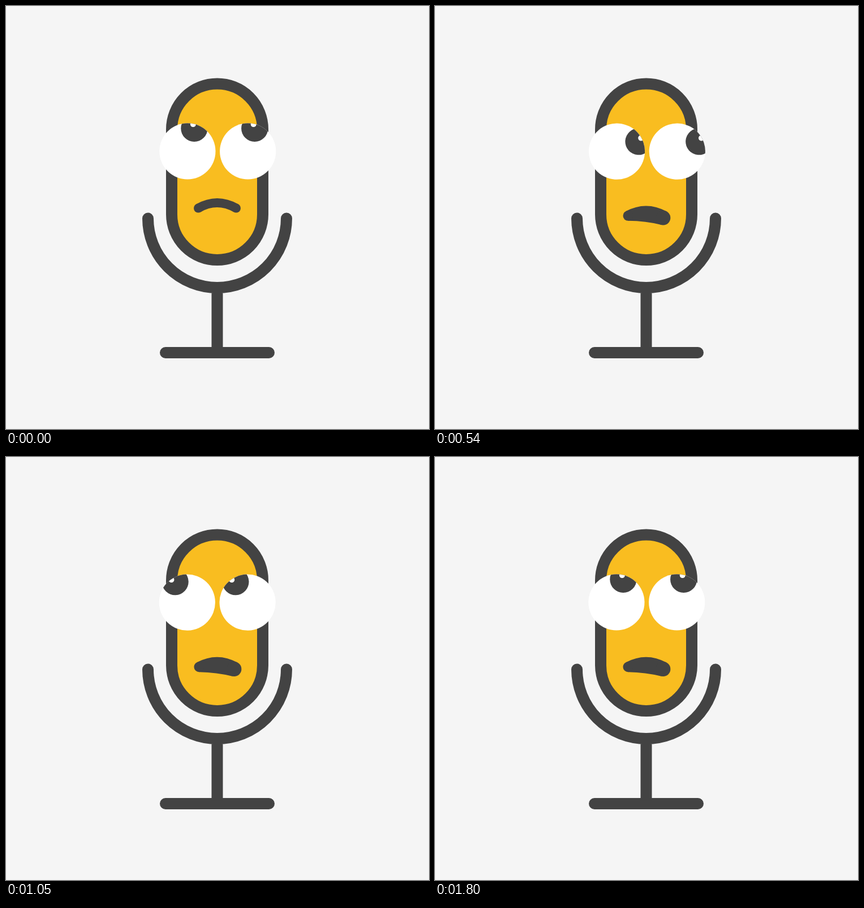
Animation of 748x748 px, one loop 1830 ms. Source, as an HTML page:

```html
<!DOCTYPE html>
<html lang="en">
<head>
<meta charset="utf-8">
<title>Microphone rolling its eyes</title>
<style>
  html, body { margin: 0; width: 100%; height: 100%; overflow: hidden; background: #f5f5f5; }
  svg { display: block; width: 100%; height: 100%; }
</style>
</head>
<body>
<svg viewBox="0 0 748 748">
  <defs>
    <clipPath id="eyeball"><circle cy="-.8" r="49.6"/></clipPath>
    <g id="eye">
      <circle cy="-.8" r="49.6" fill="#fff"/>
      <g clip-path="url(#eyeball)">
        <circle cx="12" cy="-41.3" r="23.6" fill="#434343"/>
        <circle cx="10" cy="-48.6" r="5" fill="#fff"/>
      </g>
    </g>
  </defs>
  <rect width="748" height="748" fill="#f5f5f5"/>
  <g fill="none" stroke="#434343" stroke-width="20" stroke-linecap="round">
    <rect x="293" y="137.5" width="161" height="311.5" rx="80.5" fill="#f9bd20"/>
    <path d="M251 375.5a122.5 122.5 0 0 0 245 0M373.5 498V613M282 613H465"/>
  </g>
  <use class="eye" href="#eye"/>
  <use class="eye" href="#eye"/>
  <g fill="#434343">
    <path id="lips"/>
    <circle id="leftCorner"/>
    <circle id="rightCorner"/>
  </g>
</svg>
<script>
  const LOOP = 1830, STEP = 30;
  const find = id => document.getElementById(id);
  const eyes = document.querySelectorAll('.eye');

  const mix = (a, b, u) => a + (b - a) * u;
  const progress = (t, start, length) => Math.min(1, Math.max(0, (t - start) / length));
  const smooth = u => u * u * (3 - 2 * u);
  // Backs up a little, then swings forward and settles.
  const windUp = u => u * (-0.9 + u * (4.8 - 2.9 * u));

  // Point where a line from p touches circle c; side picks one of the two.
  function touch(c, p, side) {
    const dx = p.x - c.x, dy = p.y - c.y;
    const angle = Math.atan2(dy, dx) + side * Math.acos(c.r / Math.hypot(dx, dy));
    return `${c.x + c.r * Math.cos(angle)} ${c.y + c.r * Math.sin(angle)}`;
  }

  function placeCircle(id, { x, y, r }) {
    const circle = find(id);
    circle.setAttribute('cx', x);
    circle.setAttribute('cy', y);
    circle.setAttribute('r', r);
  }

  // Two round corners joined by curves that leave each corner smoothly.
  function drawMouth(open) {
    const left = { x: mix(340, 341.5, open), y: mix(357.5, 371.2, open), r: mix(8, 9, open) };
    const right = { x: mix(407, 403.4, open), y: mix(357.5, 375, open), r: mix(8, 13, open) };
    const top = { x: 373.5, y: mix(329.5, 344, open) };
    const bottom = { x: 373, y: mix(347.5, 381, open) };
    find('lips').setAttribute('d',
      `M${touch(left, top, -1)}Q${top.x} ${top.y} ${touch(right, top, 1)}` +
      `L${touch(right, bottom, -1)}Q${bottom.x} ${bottom.y} ${touch(left, bottom, 1)}Z`);
    placeCircle('leftCorner', left);
    placeCircle('rightCorner', right);
  }

  function draw(t) {
    const angle = 360 * windUp(progress(t, 163, 1105));
    eyes.forEach((eye, i) =>
      eye.setAttribute('transform', `translate(${320.9 + 106.8 * i} 257.7) rotate(${angle})`));
    drawMouth(smooth(progress(t, 126, 455)));
  }

  const begin = performance.now();
  function tick() {
    const t = (performance.now() - begin) % LOOP;
    draw(Math.floor(t / STEP) * STEP);
    requestAnimationFrame(tick);
  }
  draw(0);
  requestAnimationFrame(tick);
</script>
</body>
</html>
```
